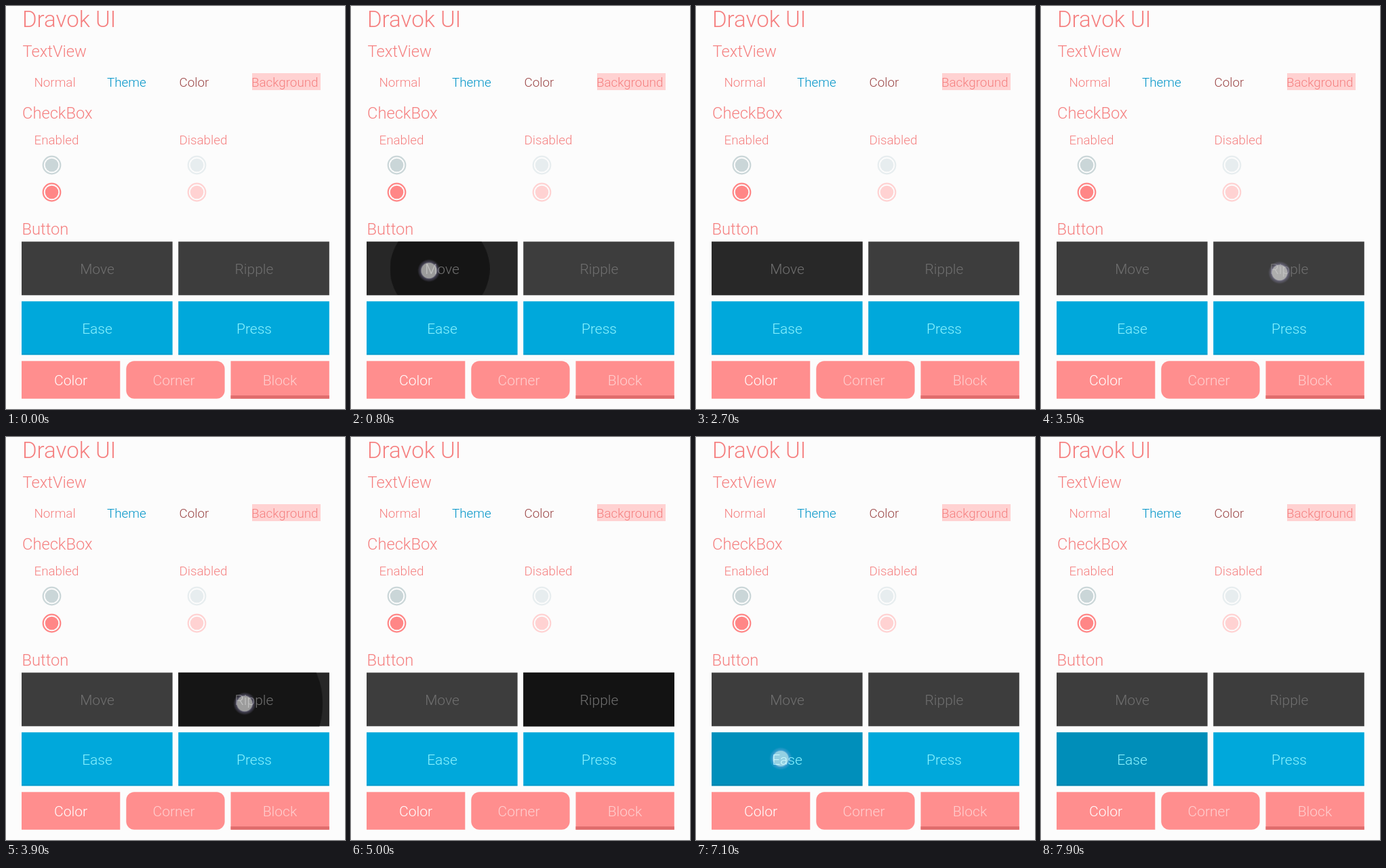
Animation, 500 px wide and 594 px high, one loop 8 s. Source, as an HTML page:

```html
<!DOCTYPE html>
<html lang="en">
<head>
<meta charset="utf-8">
<title>Widget demo</title>
<style>
  html, body { margin: 0; width: 100%; height: 100%; overflow: hidden; background: #fcfcfc; }
  svg { display: block; width: 500px; height: 594px; }
  text { font-family: Roboto, sans-serif; font-weight: 300; fill: #f58080; }
  .title { font-size: 33px; }
  .section { font-size: 23.7px; }
  .label { font-size: 18.8px; }
  .caption { font-size: 21px; text-anchor: middle; }
  .dim { fill: #707070; }
  .cyan { fill: #8cf4ff; }
  .pale { fill: #ffcfcf; }
  .dark { fill: #3d3d3d; }
  .blue { fill: #00a8db; }
  .pink { fill: #ff8e8e; }
  .edge { fill: #000; opacity: .07; }

  .move { --delay: 0s; }
  .ripple { --delay: -4.91s; }
  .ease { --delay: -1.85s; }
  .touch, .shade, .wave { animation: 8s linear var(--delay) infinite both; }
  .touch { animation-name: touch; }
  .shade { animation-name: shade; }
  .wave { animation-name: grow, vanish; transform-box: fill-box; transform-origin: center; }
  .ease .shade { animation: deepen 8s linear infinite both; }

  @keyframes touch {
    0%, 4.98% { opacity: 0; }
    5%, 18.75% { opacity: 1; }
    20%, 100% { opacity: 0; }
  }
  @keyframes shade {
    0% { opacity: 0; }
    7.5% { opacity: 0; animation-timing-function: cubic-bezier(.19, 1, .22, 1); }
    17.5% { opacity: .43; }
    30.5% { opacity: .43; animation-timing-function: ease-in; }
    38.75%, 100% { opacity: 0; }
  }
  @keyframes grow {
    0%, 7.5% { transform: translate(var(--dx), var(--dy)) scale(0); animation-timing-function: cubic-bezier(.19, 1, .22, 1); }
    17.5%, 100% { transform: none; }
  }
  @keyframes vanish {
    0%, 27.5% { opacity: .45; }
    32.5%, 100% { opacity: 0; }
  }
  @keyframes deepen {
    0%, 84.4% { opacity: 0; animation-timing-function: cubic-bezier(.19, 1, .22, 1); }
    94.4%, 100% { opacity: .15; }
  }
</style>
</head>
<body>
<svg viewBox="0 0 500 594">
  <defs>
    <radialGradient id="glow">
      <stop offset=".64" stop-color="#fff" stop-opacity=".58"/>
      <stop offset=".74" stop-color="#c8c0ff" stop-opacity=".26"/>
      <stop offset="1" stop-color="#c8c0ff" stop-opacity="0"/>
    </radialGradient>
    <clipPath id="moveClip"><rect x="23" y="347.3" width="222.6" height="79"/></clipPath>
    <clipPath id="rippleClip"><rect x="254.2" y="347.3" width="222.6" height="79"/></clipPath>
    <g id="check">
      <circle r="12.8" fill="none" stroke="currentColor" stroke-width="2.2"/>
      <circle r="9.8" fill="currentColor"/>
    </g>
  </defs>

  <text class="title" x="24" y="31">Dravok UI</text>

  <text class="section" x="24.5" y="75">TextView</text>
  <text class="label" x="41.5" y="118.5">Normal</text>
  <text class="label" x="149" y="118.5" style="fill:#0094c8">Theme</text>
  <text class="label" x="255.5" y="118.5" style="fill:#9c4848">Color</text>
  <rect x="363" y="99" width="101" height="25" fill="#ffd2d2"/>
  <text class="label" x="362" y="118.5">Background</text>

  <text class="section" x="24" y="166">CheckBox</text>
  <text class="label" x="41.5" y="204">Enabled</text>
  <text class="label" x="255.5" y="204">Disabled</text>
  <use href="#check" x="67.5" y="234.5" color="#cad6d8"/>
  <use href="#check" x="281.5" y="234.5" color="#e7edef"/>
  <use href="#check" x="67.5" y="274.5" color="#ff8686"/>
  <use href="#check" x="281.5" y="274.5" color="#ffd2d2"/>

  <text class="section" x="23.5" y="336.5">Button</text>

  <g class="move">
    <rect class="dark" x="23" y="347.3" width="222.6" height="79"/>
    <g clip-path="url(#moveClip)">
      <rect class="shade" x="23" y="347" width="223" height="80"/>
      <circle class="wave" cx="134" cy="387" r="87" style="--dx:-19px;--dy:3px"/>
    </g>
    <text class="caption dim" x="134.5" y="395">Move</text>
    <circle class="touch" cx="115" cy="390" r="17" fill="url(#glow)"/>
  </g>

  <g class="ripple">
    <rect class="dark" x="254.2" y="347.3" width="222.6" height="79"/>
    <g clip-path="url(#rippleClip)">
      <rect class="shade" x="254" y="347" width="223" height="80"/>
      <circle class="wave" cx="352" cy="393" r="134" style="--dx:0px;--dy:0px"/>
    </g>
    <text class="caption dim" x="366" y="395">Ripple</text>
    <circle class="touch" cx="352" cy="393" r="17" fill="url(#glow)"/>
  </g>

  <g class="ease">
    <rect class="blue" x="23" y="435.3" width="222.6" height="79"/>
    <rect class="edge" x="23" y="512.3" width="222.6" height="2"/>
    <rect class="shade" x="23" y="435.3" width="222.6" height="79"/>
    <text class="caption cyan" x="134.5" y="482.5">Ease</text>
    <circle class="touch" cx="125" cy="474" r="17" fill="url(#glow)"/>
  </g>

  <rect class="blue" x="254.2" y="435.3" width="222.6" height="79"/>
  <rect class="edge" x="254.2" y="512.3" width="222.6" height="2"/>
  <text class="caption cyan" x="366" y="482.5">Press</text>

  <rect class="pink" x="23" y="523.3" width="145.3" height="55.5"/>
  <text class="caption" x="95.5" y="559" style="fill:#fff">Color</text>
  <rect class="pink" x="177.3" y="523.3" width="145.3" height="55.5" rx="12"/>
  <text class="caption pale" x="247.5" y="559">Corner</text>
  <rect class="pink" x="331.5" y="523.3" width="145.3" height="55.5"/>
  <rect x="331.5" y="574" width="145.3" height="4.8" fill="#e06d6d"/>
  <text class="caption pale" x="404" y="559">Block</text>
</svg>
</body>
</html>
```
